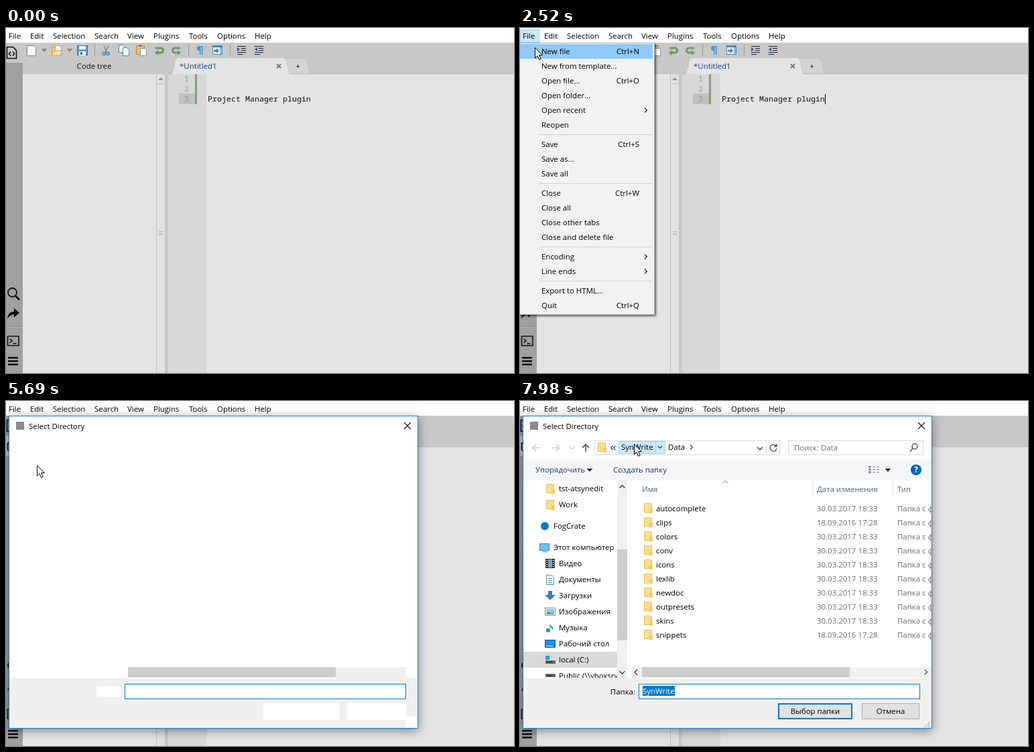
Recreate the animation shown at these times as an HTML page with a canvas. Size 758x516 px, loop 8 s.

```html
<!DOCTYPE html>
<html lang="en">
<head>
<meta charset="utf-8">
<title>Project panel</title>
<style>
html, body { margin: 0; width: 100%; height: 100%; overflow: hidden; background: #e4e4e4 }
canvas { display: block }
</style>
</head>
<body>
<canvas id="stage" width="758" height="516"></canvas>
<script>
const g = document.getElementById('stage').getContext('2d');
const UI = '11.45px "Open Sans", "Noto Sans", sans-serif';
const MONO = '11.67px "Noto Sans Mono", "DejaVu Sans Mono", monospace';
const BLUE = '#0078d7', INK = '#111';

// ---- drawing helpers ----
function rect(x, y, w, h, fill, stroke) {
  if (fill) { g.fillStyle = fill; g.fillRect(x, y, w, h); }
  if (stroke) { g.strokeStyle = stroke; g.lineWidth = 1; g.strokeRect(x + .5, y + .5, w - 1, h - 1); }
}
// Text placed by the middle of its line
function text(s, x, y, color = '#000', align = 'left', font = UI) {
  g.font = font; g.fillStyle = color; g.textAlign = align;
  g.fillText(s, x, y + 4);
}
function shape(d, x, y, fill, stroke, width = 1) {
  const p = new Path2D(d);
  g.save();
  g.translate(x, y);
  if (fill) { g.fillStyle = fill; g.fill(p); }
  if (stroke) { g.strokeStyle = stroke; g.lineWidth = width; g.stroke(p); }
  g.restore();
}
const line = (d, x, y, color, width) => shape(d, x, y, null, color, width);
function disc(x, y, r, color) {
  g.fillStyle = color; g.beginPath(); g.arc(x, y, r, 0, 7); g.fill();
}
function faded(alpha, draw) {
  if (alpha <= 0) return;
  g.save(); g.globalAlpha = Math.min(1, alpha); draw(); g.restore();
}
function clipped(x, y, w, h, draw) {
  g.save(); g.beginPath(); g.rect(x, y, w, h); g.clip(); draw(); g.restore();
}
function shadowed(blur, dx, dy, color, draw) {
  g.save();
  Object.assign(g, { shadowBlur: blur, shadowOffsetX: dx, shadowOffsetY: dy, shadowColor: color });
  draw(); g.restore();
}
const drop = (x, y, color) => shape('M-4.5-2h9L0 3z', x, y, color);
const down = (x, y, color = '#444') => line('M-4-2L0 2L4-2', x, y, color, 1.5);
const up = (x, y, color = '#444') => line('M-4 2L0-2L4 2', x, y, color, 1.5);
const next = (x, y, color = '#444') => line('M-2-3.5L1.5 0L-2 3.5', x, y, color, 1.2);
const prev = (x, y, color = '#444') => line('M2-4L-2 0L2 4', x, y, color, 1.5);
const page = (x, y, border, w = 10, h = 13) =>
  shape(`M.5 .5h${w - 3}l3 3v${h - 3}h${-w}z`, x, y, '#fafafa', border);
function folder(x, y) {
  rect(x, y - 7, 12, 14, '#ffe08a', '#e8c060');
  rect(x + 8, y + 1, 5, 7, '#f6cd68');
}

// ---- timing ----
const path = [
  [70, 670, 496], [480, 481, 178], [610, 478, 191], [840, 478, 191], [1590, 26, 23],
  [1650, 26, 23], [1820, 17, 14], [2360, 17, 14], [2950, 46, 96], [6690, 46, 96],
  [6860, 58, 97], [6950, 58, 97], [7130, 152, 97], [7200, 152, 97], [7430, 170, 64]
];
function pointer(t) {
  let i = path.findIndex(k => k[0] > t);
  if (i < 0) return path[path.length - 1].slice(1);
  const [a, x, y] = path[i - 1], [b, u, v] = path[i];
  let p = (t - a) / (b - a);
  p = p * p * (3 - 2 * p);
  return [Math.round(x + (u - x) * p), Math.round(y + (v - y) * p)];
}
const during = (t, a, b) => t >= a && t < b;

function drawPointer(t) {
  if (t < 70) return;
  const [x, y] = pointer(t);
  if (x > 299 && y > 69 && t < 2000) {
    line('M-3-7.5h2.5M.5-7.5h2.5M-3 7.5h2.5M.5 7.5h2.5M0-7V7', x + .5, y, '#000');
  } else {
    shape('M.5 .5V16L4 12.6L6.6 18.5L9.2 17.4L6.6 11.6H11.5Z', x, y, '#fff', '#000');
  }
}

// ---- main window ----
const MENU = { File: 4, Edit: 36, Selection: 70, Search: 132, View: 181, Plugins: 220, Tools: 273, Options: 315, Help: 371 };

function menuBar(t) {
  rect(0, 0, 758, 22, '#fff');
  if (during(t, 1990, 4330)) rect(0, 2, 29, 20, '#cce8ff', '#99d1ff');
  const color = during(t, 1820, 1990) ? '#6d6d6d' : '#000';
  for (const name in MENU) text(name, MENU[name], 12, color);
}

function toolbar() {
  rect(25, 22, 733, 47, '#c8c8c8');
  page(31, 26, '#888', 13, 15);
  drop(57, 33, '#888'); drop(95, 33, '#888');
  shape('M.5 2h5l2 2h6v10H.5z', 68, 26, '#f3d07a', '#c9a04a');
  page(73, 26, '#aaa', 9, 9);
  shape('M0 15l3-7h13l-3 7z', 68, 26, '#fbe3a0', '#c9a04a');
  rect(106, 26, 16, 15, '#5b9fd0', '#2f74ad');
  rect(109, 27, 10, 5, '#eef5fb'); rect(109, 35, 10, 6, '#eef5fb'); rect(111, 36, 3, 4, '#2f74ad');
  for (const x of [132, 272, 334]) rect(x, 24, 1, 18, '#9a9a9a');
  line('M4-8L8 3M11-8L6 3', 142, 34, '#7a8894', 1.3);
  line('M4 1a2.2 2.2 0 1 0 .1 0M10 1a2.2 2.2 0 1 0 .1 0', 142, 35, '#3f84c0', 1.6);
  page(168, 25, '#4a88c0', 9, 11); page(174, 29, '#4a88c0', 9, 12);
  rect(194, 26, 13, 14, '#e8bd62', '#b98a35'); rect(198, 25, 5, 3, '#8a8a8a');
  page(200, 30, '#7c94ac', 9, 11);
  const bend = 'M1 0H9a3.5 3.5 0 0 1 0 7H4';
  line(bend, 222, 30, '#6f9468', 3); shape('M5 3v8L0 7z', 222, 30, '#6f9468');
  g.save(); g.translate(261, 30); g.scale(-1, 1);
  line(bend, 0, 0, '#7f9278', 3); shape('M5 3v8L0 7z', 0, 0, '#7f9278');
  g.restore();
  shape('M9 0H3.5a3.5 3.5 0 0 0 0 7H4v6h1.5V1.5H7V13h1.5V1.5H9z', 285, 27, '#4b8fd0');
  rect(308, 26, 15, 14, '#f4f8fc', '#4a88c0'); rect(308, 26, 15, 3, '#4a88c0');
  rect(319, 29, 3, 10, '#8fbce0');
  shape('M0 2.5h4V0l4 4l-4 4V5.500H0z', 310, 30, '#3f84c8');
  for (const x of [345, 371]) {
    line('M0 0h13M6 3h7M6 6h7M0 9h13M0 12h8', x, 27.500, '#222', 1.2);
    shape(x < 360 ? 'M0 0v6l4-3z' : 'M4 0v6L0 3z', x, 29, '#3050a8');
  }
}

function sideBar(project, active) {
  rect(0, 22, 25, 494, '#a0a0a0');
  rect(0, active ? 52 : 22, 25, 30, '#c7c7c7');
  rect(0, 446, 25, 1, '#8e8e8e'); rect(0, 447, 25, 1, '#b4b4b4');
  line('M1 0h9l5 5v12H1zM6.500 7L4 10l2.500 3M9.500 7l2.500 3l-2.500 3', .5, 28.500, '#111', 1.6);
  if (project) line('M2 5L14 0l5 4v11L7 18L2 15zM2 5l5 3L19 4M7 8v10M8 3l5 3v4', .5, 58, '#111', 1.6);
  line('M15 7.500a6.500 6.500 0 1 0-13 0a6.500 6.500 0 0 0 13 0z', 1, 388, INK, 1.8);
  line('M0 0l6.500 6.500', 13.500, 400, INK, 3);
  shape('M0 16Q1 5 10 5V0l8 7l-8 7V9.500Q4 9.500 0 16z', 2, 419, INK);
  line('M0 0h16.500v14H0zM3 4l3.500 3L3 10M8 11h5', 2.500, 461, INK, 1.6);
  for (const y of [492, 497, 502]) rect(3, y, 15, 2.500, INK);
}

function projectTools() {
  rect(25, 69, 213, 22, '#c8c8c8');
  line('M0 10V0h5l1.500 2H12v2M0 10l3-6h12l-3 6z', 30.500, 75, INK, 1.2);
  line('M0 0h10l2 2v11H0zM3 0v4h6V0M2.500 13V7.500h7V13', 58, 73.500, INK, 1.5);
  rect(83, 71, 1, 18, '#999'); rect(169, 71, 1, 18, '#999');
  line('M0 0h4l1.500 2H12v8H0z', 92.500, 75, INK, 1.2);
  line('M0 0h6l3 3v9H0zM6 0v3h3', 118.500, 74, INK, 1.2);
  line('M0 0l10 10M10 0L0 10', 147, 75, INK, 1.2);
  g.setLineDash([2.500, 1.900]);
  line('M5 0a5 5 0 1 1-10 0a5 5 0 1 1 10 0', 186, 80, INK, 2.500);
  g.setLineDash([]);
  line('M3.500 0a3.500 3.500 0 1 1-7 0a3.500 3.500 0 1 1 7 0', 186, 80, INK, 3);
}

function leftPanel(project, ready, wide) {
  rect(25, 69, 213 + wide, 447, '#e4e4e4');
  text(project ? 'Project' : 'Code tree', 131.500 + wide / 2, 57, '#111', 'center');
  const top = project ? 91 : 69, x = 224 + wide;
  if (project) {
    if (wide) rect(238, 69, wide, 22, '#c8c8c8');
    projectTools();
  }
  if (ready) {
    rect(31, 93, 12, 14, '#c8a468'); rect(39, 100, 4, 7, '#dfc59a');
    text('(Unsaved project)', 49, 100, '#222');
  }
  rect(x, top, 14, 516 - top, '#e2e2e2');
  rect(x, top, 1, 516 - top, '#c4c4c4'); rect(x + 13, top, 1, 516 - top, '#c4c4c4');
  rect(x, top + 14, 14, 1, '#c4c4c4');
  shape('M-4 2L0-2L4 2z', x + 7, top + 7, '#909090');
  const grip = (top + 545) / 2;
  for (const y of [-3, 0, 2]) rect(x + 4, Math.round(grip) + y, 6, 1, '#b4b4b4');
  rect(238 + wide, 69, 4, 447, '#c8c8c8');
}

function editor(caret, wide) {
  g.save();
  g.translate(wide, 0);
  shape('M417 45h29q3 0 4 4l4 20h-31z', 0, 0, '#d3d3d3', '#bcbcbc');
  rect(242, 68, 516, 1, '#bababa');
  rect(242, 69, 516, 447, '#e4e4e4');
  shape('M247 70q3-4 5-16q1-9 5-9h157q4 0 5 9l4 16z', 0, 0, '#e4e4e4');
  text('*Untitled1', 259, 57, '#1c3f9c');
  line('M-3-3L3 3M3-3L-3 3', 407, 57, '#777', 2);
  text('+', 435.500, 57, '#111', 'center');
  rect(242, 69, 57, 447, '#d8d8d6');
  rect(258, 98, 24, 16, '#c0c0c0');
  rect(282, 69, 3, 45, '#7f9f80');
  ['#749db5', '#8fa49a', '#929a92'].forEach((c, i) => text(i + 1, 273, 76 + 15 * i, c, 'right', MONO));
  text('Project Manager plugin', 301, 106, '#111', 'left', MONO);
  if (caret) rect(455, 99, 1, 15, '#000');
  g.restore();
}

// ---- File menu ----
const ITEMS = [
  [35, 'New file', 'Ctrl+N'], [57, 'New from template...'], [79, 'Open file...', 'Ctrl+O'],
  [101, 'Open folder...'], [123, 'Open recent', '>'], [145, 'Reopen'],
  [174, 'Save', 'Ctrl+S'], [196, 'Save as...'], [218, 'Save all'],
  [247, 'Close', 'Ctrl+W'], [269, 'Close all'], [291, 'Close other tabs'], [313, 'Close and delete file'],
  [342, 'Encoding', '>'], [364, 'Line ends', '>'], [393, 'Export to HTML...'], [415, 'Quit', 'Ctrl+Q']
];
function fileMenu(t) {
  shadowed(3, 2, 2, 'rgba(0,0,0,.6)', () => rect(-2, 22, 203, 407, '#f2f2f2'));
  rect(-2, 22, 203, 407, null, '#b5b5b5');
  const y = pointer(t)[1];
  for (const s of [159, 232, 327, 378]) rect(28, s, 169, 1, '#d2d2d2');
  for (const [mid, label, key] of ITEMS) {
    if (y >= mid - 11 && y < mid + 11) rect(0, mid - 11, 198, 22, '#91c9f7');
    text(label, 32, mid);
    if (key === '>') next(188, mid, '#222');
    else if (key) text(key, 178, mid, '#000', 'right');
  }
}

// ---- directory dialog ----
function addressRow(t) {
  rect(5, 55, 609, 32, '#fff');
  for (const [x, s] of [[25, -1], [53, 1]]) line(`M${-6 * s} 0H${6 * s}M${s} -5L${6 * s} 0L${s} 5`, x, 70, '#cfcfcf', 1.6);
  down(77, 70, '#ccc');
  line('M0 6V-5M-5 0L0-5L5 0', 98, 70, '#555', 1.7);
  rect(111, 59, 277, 22, '#fff', '#d9d9d9');
  folder(116, 69);
  const hot = t >= 7750;
  if (hot) {
    rect(147, 60, 70, 19, '#cce8ff', '#99d1ff'); rect(202, 60, 1, 19, '#99d1ff');
  }
  line('M3-3L0 0L3 3M7-3L4 0L7 3', 135.500, 70, '#333', 1.1);
  text('SynWrite', 151, 69);
  if (hot) line('M-3-1.500L0 1.500L3-1.500', 209, 69, '#444', 1.2);
  else next(209, 69);
  text('Data', 221, 69);
  if (t >= 7350) next(256, 69);
  down(358, 71);
  rect(367, 60, 1, 20, '#d9d9d9');
  line('M4-3A5 5 0 1 0 5 1M5-6v4H1', 378, 70, '#555', 1.4);
  rect(400, 59, 202, 22, '#fff', '#d9d9d9');
  text('Поиск: Data', 409, 70, '#6d6d6d');
  line('M4-2a4 4 0 1 1-8 0a4 4 0 1 1 8 0M-3 1L-7 5.500', 589, 70, '#555', 1.5);
}

function commandRow(t) {
  rect(5, 87, 609, 32, '#f5f6f7');
  if (during(t, 6690, 7010)) rect(8, 90, 116, 26, '#d6ebf5', '#70c0e7');
  text('Упорядочить', 23, 103, '#1e395b');
  drop(104, 103, '#1e395b');
  text('Создать папку', 139, 103, '#1e395b');
  for (const y of [97, 101, 105]) {
    rect(520, y, 4, 3, '#8a9aaa'); rect(526, y + 1, 4, 1, '#888'); rect(532, y + 1, 4, 1, '#888');
  }
  drop(549, 103, '#1e395b');
  disc(591, 103, 8, '#0063b1');
  text('?', 591, 103, '#fff', 'center', 'bold 12px "Open Sans", sans-serif');
}

const screen = (x, y, fill) => rect(x, y - 6, 15, 11, fill, '#3b78a8');
const drive = (x, y) => { rect(x, y, 15, 5, '#444', '#777'); rect(x + 11, y + 2, 2, 1, '#8f8'); };
const TREE = [
  [131, 'tst-atsynedit', y => folder(39, y)],
  [155, 'Work', y => folder(39, y)],
  [187, 'FogCrate', y => disc(37, y, 6, BLUE), 50],
  [219, 'Этот компьютер', y => { screen(29, y, '#6cc4f0'); rect(33, y + 6, 8, 1, '#678'); }, 50],
  [243, 'Видео', y => {
    rect(38, y - 7, 14, 14, '#333'); rect(42, y - 6, 6, 12, '#7aa6c8');
    for (let i = -5; i < 6; i += 3) { rect(39, y + i, 2, 1, '#eee'); rect(49, y + i, 2, 1, '#eee'); }
  }],
  [267, 'Документы', y => { page(39, y - 7, '#5a8fb8', 11, 14); line('M0 0h6M0 3h6M0 6h6', 42, y - 1.500, '#3a8fd0'); }],
  [291, 'Загрузки', y => shape('M-3-7h6v6h5L0 7L-8-1h5z', 45, y, '#2f7fd0')],
  [315, 'Изображения', y => { rect(37, y - 6, 16, 12, '#fff', '#888'); rect(39, y - 4, 12, 8, '#8cc8ec'); shape('M0 4L4 0l3 3l2-1l3 2z', 39, y, '#4f7f58'); }],
  [339, 'Музыка', y => { shape('M-1-7Q0-3 4-1Q5 2 3 4Q3 0 0-1V4z', 45, y, '#1c8fe0'); disc(42, y + 4, 3, '#1c8fe0'); }],
  [363, 'Рабочий стол', y => { rect(37, y - 6, 16, 12, '#1593e6', '#0a5fa4'); rect(39, y + 3, 10, 1, '#cfe9fb'); }],
  [387, 'local (C:)', y => { rect(38, y - 6, 6, 6, '#19a3e8'); drive(38, y + 1); }],
  [411, 'Public (\\\\vboxsrv)', y => drive(38, y - 3)]
];
function tree() {
  clipped(5, 119, 140, 295, () => {
    rect(5, 375, 140, 24, '#d9d9d9');
    for (const [y, label, icon, x = 58] of TREE) { icon(y); text(label, x, y); }
  });
  rect(145, 119, 15, 295, '#f0f0f0');
  rect(145, 222, 15, 136, '#cdcdcd');
  up(152.500, 128); down(152.500, 406);
  rect(163, 119, 1, 295, '#f4f4f4');
}

const NAMES = 'autocomplete clips colors conv icons lexlib newdoc outpresets skins snippets'.split(' ');
function fileList() {
  clipped(164, 119, 450, 295, () => {
    line('M-4 2L0-2L4 2', 306.500, 121, '#777');
    text('Имя', 182, 132, '#4c607a');
    text('Дата изменения', 443, 132, '#4c607a');
    text('Тип', 563, 132, '#4c607a');
    rect(436, 119, 1, 25, '#e5e5e5'); rect(556, 119, 1, 25, '#e5e5e5');
    NAMES.forEach((name, i) => {
      const y = 161 + 21 * i;
      folder(185, y - 1);
      text(name, 203, y);
      text(i % 8 === 1 ? '18.09.2016 17:28' : '30.03.2017 18:33', 443, y, '#6d6d6d');
      text('Папка с файлами', 563, y, '#6d6d6d');
    });
    rect(166, 398, 448, 15, '#f0f0f0');
    rect(182, 398, 310, 15, '#cdcdcd');
    prev(173, 405.500); next(606, 405.500);
  });
}

function button(x, w, label, main) {
  rect(x, 452, w, 24, '#e1e1e1', main ? BLUE : '#adadad');
  if (main) rect(x + 1, 453, w - 2, 22, null, BLUE);
  text(label, x + w / 2, 464, '#000', 'center');
}

function footer(t) {
  rect(5, 414, 609, 75, '#f0f0f0');
  if (t < 6220) {
    rect(135, 427, 37, 15, '#fff'); rect(384, 451, 113, 26, '#fff');
    rect(509, 451, 88, 26, '#fff'); rect(597, 472, 17, 17, '#fff');
  } else {
    text('Папка:', 172, 435, '#000', 'right');
    button(385, 111, 'Выбор папки', true);
    button(510, 86, 'Отмена');
    for (let i = 0; i < 3; i++) for (let j = 0; j <= i; j++) rect(609 - 3 * j, 480 + 3 * i, 2, 2, '#bfbfbf');
  }
  rect(177, 423, 420, 23, '#fff', BLUE);
  if (during(t, 7220, 7750)) rect(183, 426, 1, 15, '#000');
  if (t >= 7980) {
    rect(183, 426, 48, 15, BLUE);
    text('SynWrite', 183, 434, '#fff');
  }
}

function tip(x, y, w, lines) {
  const h = 4 + 15 * lines.length;
  shadowed(3, 2, 2, 'rgba(0,0,0,.5)', () => rect(x, y, w, h, '#fff'));
  rect(x, y, w, h, null, '#767676');
  lines.forEach((s, i) => text(s, x + 6, y + 10 + 15 * i, '#575757'));
}

function dialog(t) {
  shadowed(14, 0, 3, 'rgba(0,0,0,.45)', () => rect(4, 22, 611, 468, '#fff'));
  rect(4, 22, 611, 468, '#fff', '#1883d7');
  rect(15, 31, 12, 12, '#8a8a8a');
  text('Select Directory', 34, 38);
  line('M-5-5L5 5M5-5L-5 5', 599, 37, '#111', 1.1);
  footer(t);
  if (t >= 6140) { addressRow(t); commandRow(t); }
  if (t >= 6300) tree();
  if (t >= 6380) fileList();
  else { rect(182, 398, 310, 15, '#cdcdcd'); rect(492, 398, 105, 16, '#f0f0f0'); }
  if (during(t, 6800, 7020)) faded((t - 6740) / 120, () => tip(48, 115, 213, ['Упорядочивание содержимого этой', 'папки.']));
  if (during(t, 7200, 7520)) tip(142, 115, 99, ['Создание папки']);
}

// ---- whole picture ----
function draw(t) {
  const project = t >= 4550, ready = t >= 5030;
  const wide = project && !ready ? 72 : 0;
  const caret = during(t, 2520, 3170) || during(t, 3820, 4300);
  rect(0, 0, 758, 516, '#e4e4e4');
  toolbar();
  sideBar(project, ready);
  editor(caret, wide);
  leftPanel(project, ready, wide);
  menuBar(t);
  if (during(t, 1990, 4400)) faded(Math.min((t - 1950) / 160, (4400 - t) / 100), () => fileMenu(t));
  if (t >= 5420) {
    const p = Math.min(1, (t - 5360) / 320), k = 1 - .1 * (1 - p) ** 2;
    faded(p, () => {
      g.translate(309.500, 256); g.scale(k, k); g.translate(-309.500, -256);
      dialog(t);
    });
  }
  drawPointer(t);
}

const start = performance.now();
function tick(now) {
  draw(Math.max(0, now - start) % 8000);
  requestAnimationFrame(tick);
}
draw(0);
requestAnimationFrame(tick);
</script>
</body>
</html>
```
